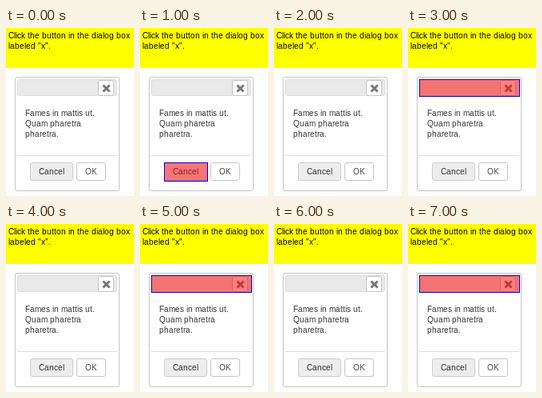
An HTML page that plays this animation: 160x210 px, repeating every 8000 ms.

```html
<!DOCTYPE html>
<html lang="en">
<head>
<meta charset="utf-8">
<style>
  html, body { margin: 0; width: 100%; height: 100%; overflow: hidden; background: #fff; }
  body { font: 10px/13px "Liberation Sans", Arial, sans-serif; font-kerning: none; }
  div, svg { position: absolute; box-sizing: border-box; }
  .text { white-space: pre; }
  #query { left: 0; top: 0; width: 160px; height: 50px; padding: 3px; background: #ff0; color: #000; }
  #dialog { left: 11px; top: 61px; width: 131px; height: 143px; border: 1px solid #c5c5c5; border-radius: 3px; }
  #title { left: 14px; top: 64px; width: 125px; height: 21px; border: 1px solid #ddd; border-radius: 3px; background: #e9e9e9; }
  #message { left: 24px; top: 100px; width: 105px; color: #333; }
  #rule { left: 14px; top: 159px; width: 125px; height: 1px; background: #ddd; }
  .button { border: 1px solid #c5c5c5; border-radius: 3px; background: #fff; color: #454545; }
  .label { top: 168px; height: 23px; padding: 4px 10px; }
  #close { left: 115px; top: 65px; width: 20px; height: 20px; }
  #cancel { left: 30px; width: 54px; border-color: #ccc; background: #ededed; color: #2b2b2b; }
  #ok { left: 88px; width: 37px; }
  #cross { left: 0; top: 0; }
  #highlight { border: 1px solid #00f; background: rgba(255, 0, 0, .5); background-clip: padding-box; visibility: hidden; }
</style>
</head>
<body>
<div id="query" class="text">Click the button in the dialog box
labeled "x".</div>
<div id="dialog"></div>
<div id="title"></div>
<div id="close" class="button"></div>
<svg id="cross" width="160" height="210">
  <path d="M122.5 72.5l6 6m0-6l-6 6" fill="none" stroke="#777" stroke-width="3" stroke-linecap="square"/>
</svg>
<div id="message" class="text">Fames in mattis ut.
Quam pharetra
pharetra.</div>
<div id="rule"></div>
<div id="cancel" class="button label text">Cancel</div>
<div id="ok" class="button label text">OK</div>
<div id="highlight"></div>
<script>
  const LOOP = 8000, BEAT = 1000;
  const cancelBox = [30, 168, 55, 24];
  const titleBox = [14, 64, 126, 22];
  const highlight = document.getElementById('highlight');
  const pen = document.createElement('canvas').getContext('2d');

  // Whole-pixel advances, as with hinted text.
  function snapText(element) {
    pen.font = getComputedStyle(element).font;
    const spans = [...element.textContent].map(char => {
      const span = document.createElement('span');
      const width = pen.measureText(char).width;
      span.textContent = char;
      if (char !== '\n') span.style.letterSpacing = Math.round(width) - width + 'px';
      return span;
    });
    element.replaceChildren(...spans);
  }

  function place([x, y, w, h]) {
    Object.assign(highlight.style, {
      left: x + 'px', top: y + 'px', width: w + 'px', height: h + 'px'
    });
  }

  // Every odd beat flashes a box: first the button, then the title bar.
  function draw(now) {
    const beat = Math.floor(now % LOOP / BEAT);
    place(beat < 2 ? cancelBox : titleBox);
    highlight.style.visibility = beat % 2 ? 'visible' : 'hidden';
  }

  function tick() {
    draw(performance.now());
    requestAnimationFrame(tick);
  }

  document.querySelectorAll('.text').forEach(snapText);
  tick();
</script>
</body>
</html>
```
